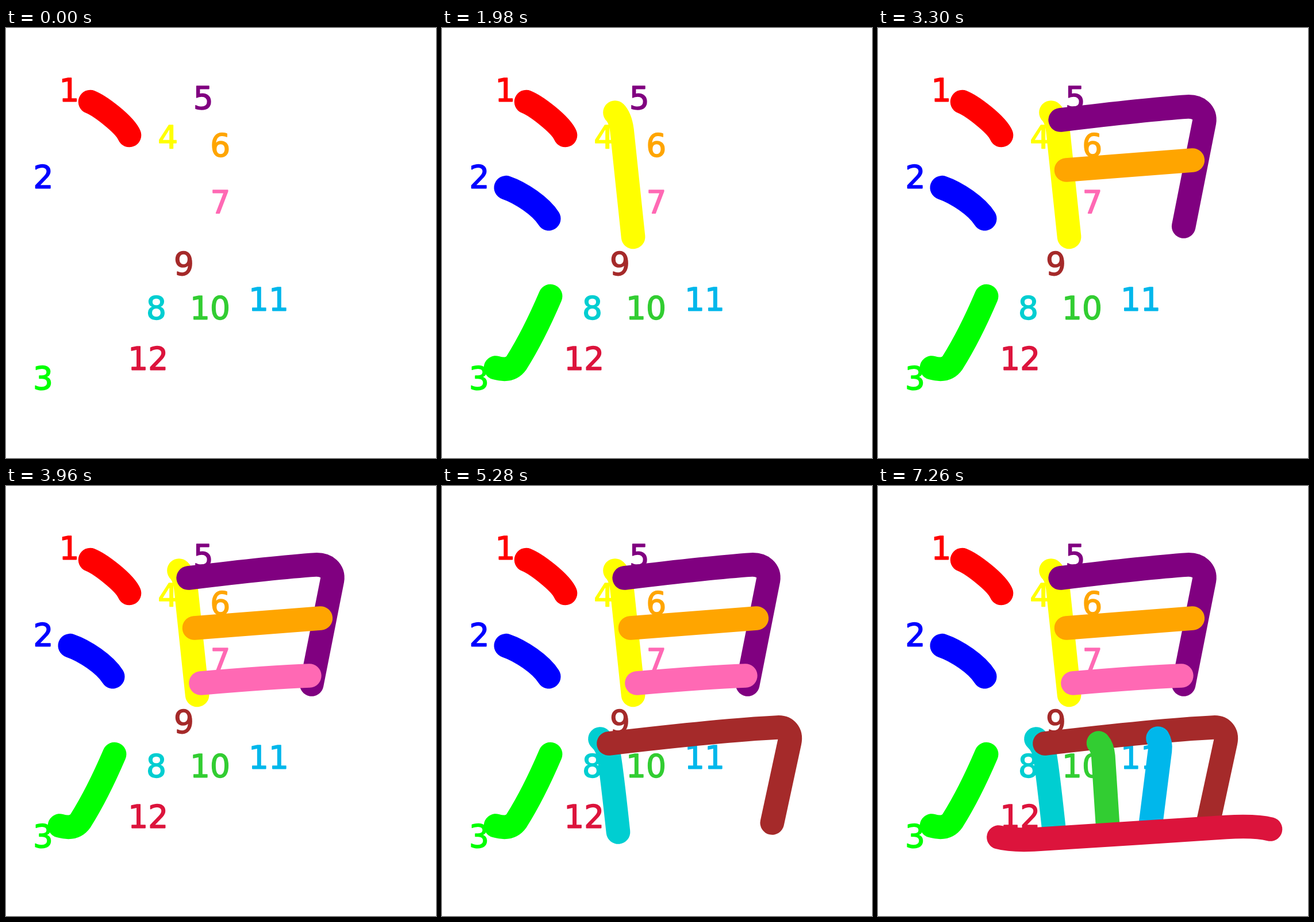
Write an HTML page with a canvas that moves like this. It is 748 px wide and 748 px high and loops after 7920 ms.

```html
<!DOCTYPE html>
<html lang="en">
<head>
<meta charset="utf-8">
<title>Stroke order</title>
<style>
  html, body { margin: 0; width: 100%; height: 100%; overflow: hidden; background: #fff; }
  canvas { display: block; }
</style>
</head>
<body>
<canvas id="stage" width="748" height="748"></canvas>
<script>
const SIZE = 748;
const UNIT = SIZE / 109;
const STEP = 660;
const BRUSH = 6 * UNIT + 0.5;
const TEXT_WEIGHT = 1.6;

// Each stroke: colour, label origin, path
const strokes = [
  ['#ff0000', 92.6, 127, 'M146.6,128.5 C163,135 206,167 214.5,186.5'],
  ['#0000ff', 47.5, 278, 'M111.3,277.7 C137,286.5 172,310 185.7,331.6'],
  ['#00ff00', 47, 628, 'M93.5,591 C108,595 121,594.5 129.5,582.5 C150,550 170,510 188.6,466.6'],
  ['#ffff00', 264.3, 209.2, 'M301,147 Q310,156 313,178 L332.6,363.5'],
  ['#800080', 325.8, 141, 'M317.2,160 Q470,141.5 538,137 C557,136 570.5,147 567.5,164 L531.7,345'],
  ['#ffa500', 355.3, 223.2, 'M327.5,247 L547.3,230'],
  ['#ff69b4', 355.5, 321.5, 'M339,343 Q460,332.5 527.8,330'],
  ['#00ced1', 244, 506, 'M275,440 C284,448 288,457 290.5,470 C295,497 302,560 306.5,602'],
  ['#a52a2a', 292, 429, 'M290,448 Q490,424.5 583,420 C599,419 608,430 604.5,446 L574.3,586'],
  ['#32cd32', 320, 506, 'M383.6,447 Q390.5,455 391.8,470 L400,596.5'],
  ['#00b7eb', 422, 490.7, 'M487,439 Q492,447 490.5,460 L473.7,593'],
  ['#dc143c', 212.3, 593.6, 'M210,611 C221,614 244,616 270,615 C330,612 520,598.5 605,593.5 C640,591.5 667,593 682.5,597']
].map(([color, x, y, d]) => ({ color, x, y, path: new Path2D(d) }));

const ctx = document.getElementById('stage').getContext('2d');
ctx.font = `${8 * UNIT}px "DejaVu Sans", Verdana, sans-serif`;
ctx.lineCap = ctx.lineJoin = 'round';

function drawLabel({ color, x, y }, i) {
  ctx.fillStyle = ctx.strokeStyle = color;
  ctx.fillText(i + 1, x, y);
  ctx.strokeText(i + 1, x, y);
}

function drawStroke({ color, path }) {
  ctx.strokeStyle = color;
  ctx.stroke(path);
}

function draw(count) {
  ctx.fillStyle = '#fff';
  ctx.fillRect(0, 0, SIZE, SIZE);
  ctx.lineWidth = TEXT_WEIGHT;
  strokes.forEach(drawLabel);
  ctx.lineWidth = BRUSH;
  strokes.slice(0, count).forEach(drawStroke);
}

const start = performance.now();

function tick() {
  const elapsed = performance.now() - start;
  draw(Math.floor(elapsed / STEP) % strokes.length + 1);
  requestAnimationFrame(tick);
}

tick();
</script>
</body>
</html>
```
